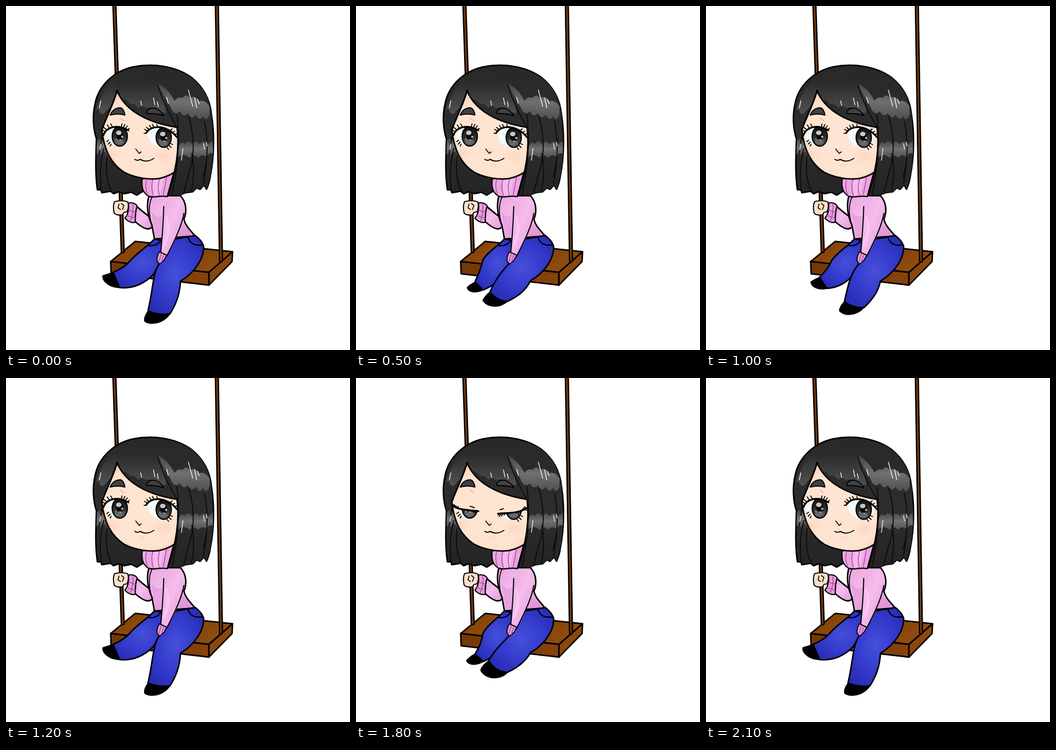
Write an HTML page without scripts that moves like this. It is 700 px wide and 700 px high and loops after 2200 ms.

```html
<!DOCTYPE html>
<html lang="en">
<head>
<meta charset="utf-8">
<title>Girl on a swing</title>
<style>
html, body { margin: 0; width: 100%; height: 100%; overflow: hidden; background: #fff; }
svg { display: block; width: 100vw; height: 100vh; }
path { stroke-linecap: round; stroke-linejoin: round; }
.ink { stroke: #000; stroke-width: 3; }
.thin { stroke: #000; stroke-width: 1.8; fill: none; }
.line { stroke: #000; stroke-width: 3; fill: none; }
.rib { stroke: #a8479d; stroke-width: 1.5; fill: none; }
.shine { stroke: #fff; stroke-width: 1.4; fill: none; }
.lock { stroke: #0b0b0b; stroke-width: 2; fill: none; }

.leg, .foot { d: var(--out); animation: swing 2.2s steps(3) infinite; }
.lid, .cover { d: var(--open); animation: blink 2.2s steps(3) infinite; }
.lid { stroke: #000; stroke-width: 3.6; fill: none; }
.lash { stroke-width: 1.9; }
.cover { fill: #fee4d1; }

/* one step per 100 ms */
@keyframes swing {
  0%, 95.45%, 100% { d: var(--out); animation-timing-function: steps(2); }
  9.09% { d: var(--mid); animation-timing-function: steps(5); }
  31.81% { d: var(--in); animation-timing-function: steps(5); }
  54.54% { d: var(--out); }
  68.18% { d: var(--mid2); }
  81.81% { d: var(--near); }
}
@keyframes blink {
  0%, 54.54%, 95.45%, 100% { d: var(--open); }
  68.18% { d: var(--half); }
  81.81% { d: var(--low); }
}

.back.leg {
  --out: path("M302 474C290 488 269 500 252 519C243 530 230 537 218 542L231 573C259 576 284 564 301 545L335 480Z");
  --mid: path("M302 474C290 488 269 500 254 518C247 531 239 541 229 554L244 579C266 575 286 563 302 545L335 480Z");
  --mid2: path("M302 474C290 488 269 500 254 518C247 531 239 541 229 554L244 579C266 575 286 563 302 545L335 480Z");
  --near: path("M302 474C290 488 269 500 258 520C256 538 250 548 242 562L259 577C272 572 286 560 302 545L335 480Z");
  --in: path("M302 474C290 488 267 500 261 516C260 538 254 550 251 567L268 577C280 570 290 562 302 545L335 480Z");
}
.back.foot {
  --out: path("M218 542C208 546 202 547 197 549C196 561 212 573 231 573Z");
  --mid: path("M229 554C219 558 213 559 209 562C208 575 224 580 244 579Z");
  --mid2: path("M229 554C219 558 213 559 209 562C208 575 224 580 244 579Z");
  --near: path("M242 562C234 565 229 571 225 575C228 584 244 586 259 577Z");
  --in: path("M251 567C245 571 240 576 238 580C241 586 254 589 268 577Z");
}
.front.leg {
  --out: path("M345 474C336 490 322 508 313 523C298 542 300 575 289 620C300 626 320 629 334 626C350 600 354 580 355 560C385 542 404 512 402 488C398 478 392 472 385 467Z");
  --mid: path("M345 474C336 490 322 508 313 523C300 545 292 572 275 597C286 605 300 610 314 612C335 597 348 578 355 559C385 542 404 512 402 488C398 478 392 472 385 467Z");
  --mid2: path("M345 474C336 490 322 508 313 523C298 543 288 570 271 594C282 602 298 606 311 605C333 592 346 576 355 559C385 542 404 512 402 488C398 478 392 472 385 467Z");
  --near: path("M345 474C336 490 322 508 313 523C296 541 280 556 270 575C278 590 294 599 308 599C332 588 346 575 355 559C385 542 404 512 402 488C398 478 392 472 385 467Z");
  --in: path("M345 474C336 490 322 508 313 523C290 540 274 553 271 572C278 586 292 595 304 594C332 584 346 575 355 559C385 542 404 512 402 488C398 478 392 472 385 467Z");
}
.front.foot {
  --out: path("M289 621C284 628 281 636 282 641C290 649 318 649 334 626C320 629 300 627 289 621Z");
  --mid: path("M275 597C268 604 262 611 262 616C272 630 300 629 314 612C300 610 286 605 275 597Z");
  --mid2: path("M271 594C263 600 257 605 257 609C266 623 298 624 311 605C298 606 282 602 271 594Z");
  --near: path("M270 575C262 582 254 589 254 595C264 614 294 615 308 599C294 599 278 590 270 575Z");
  --in: path("M271 572C263 578 258 584 256 589C270 605 288 604 304 594C292 595 278 586 271 572Z");
}

.left.cover {
  --open: path("M199 263C204 248 226 236 249 252L250 236L200 236Z");
  --half: path("M197 262C208 255 232 255 250 265L250 236L200 236Z");
  --low: path("M197 261C210 271 232 268 250 271L250 236L200 236Z");
}
.left.lid {
  --open: path("M198 263C204 247 226 239 249 253");
  --half: path("M197 260C208 254 232 255 248 265");
  --low: path("M197 260C210 270 232 268 249 271");
}
.left.lash {
  --open: path("M202 256L196 252M205 252L199 247M210 248L206 242M216 245L213 240M239 247L242 241M243 249L247 244M247 252L251 249M235 245L236 240");
  --half: path("M200 259L195 256M202 258L198 255M206 257L202 254M214 256L211 254M239 259L240 258M244 262L246 261M247 264L248 263M233 257L234 256");
  --low: path("M201 262L197 257M204 264L200 258M207 266L203 260M210 267L207 261M233 269L240 273M240 270L244 274M232 261L236 262M236 262L241 264");
}
.right.cover {
  --open: path("M284 262C292 240 326 238 349 267L352 236L280 236Z");
  --half: path("M281 266C298 258 328 260 348 266L352 236L280 236Z");
  --low: path("M286 278C306 274 330 277 348 264L352 236L280 236Z");
}
.right.lid {
  --open: path("M286 257C296 242 326 241 348 267");
  --half: path("M281 265C298 257 328 260 348 266");
  --low: path("M289 276C306 274 330 277 348 264");
}
.right.lash {
  --open: path("M289 255L282 251M292 252L286 247M296 249L292 243M301 247L298 241M286 259L281 259M334 254L338 250M338 258L343 255M342 262L348 260M308 246L307 241");
  --half: path("M287 263L281 262M291 261L285 260M295 260L290 258M300 260L297 258M285 265L282 268M334 262L337 260M338 263L343 261M342 265L349 262M308 260L306 259");
  --low: path("M292 277L289 279M295 277L291 282M299 276L296 281M303 276L301 279M293 268L300 266M337 270L344 262M339 269L349 265M342 267L349 270M310 276L308 278");
}
</style>
</head>
<body>
<svg viewBox="0 0 700 700">
  <defs>
    <linearGradient id="wood" x1="0" x2="1" y2=".4">
      <stop offset="0" stop-color="#7d3d05"/><stop offset=".4" stop-color="#924c0b"/>
      <stop offset=".6" stop-color="#7f3f05"/><stop offset="1" stop-color="#8f4c0f"/>
    </linearGradient>
    <linearGradient id="plank" x1="0" x2="1">
      <stop offset="0" stop-color="#743804"/><stop offset="1" stop-color="#87430a"/>
    </linearGradient>
    <linearGradient id="knit" x1="0" x2="1" y2="1">
      <stop offset="0" stop-color="#eaa6e0"/><stop offset=".45" stop-color="#f5bdec"/>
      <stop offset="1" stop-color="#e397d8"/>
    </linearGradient>
    <radialGradient id="jeans" cx=".5" cy=".48" r=".6">
      <stop offset="0" stop-color="#4650d9"/><stop offset=".5" stop-color="#363dce"/>
      <stop offset="1" stop-color="#282cb6"/>
    </radialGradient>
    <radialGradient id="skin" gradientUnits="userSpaceOnUse" cx="275" cy="270" r="105">
      <stop offset="0" stop-color="#fee5d3"/><stop offset=".75" stop-color="#fee3cf"/>
      <stop offset="1" stop-color="#fbd0b8"/>
    </radialGradient>
    <radialGradient id="blush">
      <stop offset="0" stop-color="#f7a99b" stop-opacity=".22"/><stop offset="1" stop-color="#f7a99b" stop-opacity="0"/>
    </radialGradient>
    <linearGradient id="iris" x2="0" y2="1">
      <stop offset="0" stop-color="#0d0d0d"/><stop offset=".5" stop-color="#2c2c2c"/>
      <stop offset="1" stop-color="#606060"/>
    </linearGradient>
    <linearGradient id="gloss" x2="0" y2="1">
      <stop offset="0" stop-color="#555" stop-opacity="0"/><stop offset="1" stop-color="#606060"/>
    </linearGradient>
    <linearGradient id="band" x2="0" y2="1">
      <stop offset="0" stop-color="#444"/><stop offset=".5" stop-color="#707070"/>
      <stop offset="1" stop-color="#505050"/>
    </linearGradient>
    <linearGradient id="hair" x2="0" y2="1">
      <stop offset="0" stop-color="#292929"/><stop offset=".55" stop-color="#2d2d2d"/>
      <stop offset="1" stop-color="#242424"/>
    </linearGradient>
    <g id="eye">
      <ellipse rx="15.5" ry="20" fill="url(#iris)" stroke="#000" stroke-width="2.4"/>
      <ellipse cy="-1" rx="7" ry="9" fill="#0a0a0a"/>
      <ellipse cx="-1" cy="11" rx="9" ry="5" fill="#858585" opacity=".5"/>
      <ellipse cx="-2" cy="-7" rx="5.5" ry="4.5" fill="#c8c8c8"/>
      <circle cx="5" cy="1" r="2.2" fill="#bbb"/>
      <circle cx="-8" cy="6" r="1.5" fill="#999"/>
      <circle cx="1" cy="8" r="1.2" fill="#ccc"/>
    </g>
  </defs>

  <!-- swing -->
  <g class="ink">
    <path d="M213 520L263 479L461 500L413 542Z" fill="url(#wood)"/>
    <path d="M213 520L413 542V568L214 545Z" fill="url(#plank)"/>
    <path d="M413 542L461 500L460 520L413 568Z" fill="#8a480d"/>
  </g>
  <g fill="none">
    <path d="M220.5 -5L237.5 499M429 -5L437.5 518" stroke="#000" stroke-width="8.6"/>
    <path d="M220.5 -5L237.5 499M429 -5L437.5 518" stroke="#7b3a06" stroke-width="3.2"/>
  </g>

  <!-- holding arm -->
  <path class="ink" d="M265 407C273 414 281 421 291 428L298 449C291 457 281 455 262 438Z" fill="url(#knit)"/>
  <path class="ink" d="M249 401C256 399 264 402 267 407C263 417 263 428 263 440C256 442 248 438 242 432C248 424 251 413 249 401Z" fill="#e79cdc" style="stroke-width:2.4"/>
  <path class="rib" d="M258 404Q260 420 253 437M248 415L264 420M245 426L263 432"/>
  <path class="ink" d="M221 398C228 396 242 395 248 399C250 406 249 413 246 419L240 420L237 425C230 426 222 425 220 421C218 412 218 404 221 398Z" fill="#fde0ca" style="stroke-width:2.2"/>
  <path class="thin" d="M230 403L228 411L233 414M235 402L240 406L237 414"/>

  <!-- body -->
  <path class="ink" d="M291 386C285 406 289 428 297 446L302 474L385 468C374 455 365 447 362 434C368 420 368 400 355 386Z" fill="url(#knit)"/>
  <path d="M296 418Q308 435 318 425L316 470L303 471Z" fill="#d583cb" opacity=".4"/>
  <path d="M353 440Q365 448 378 466L346 469Z" fill="#d583cb" opacity=".35"/>
  <path class="thin" d="M297 389C290 404 290 425 297 446"/>

  <!-- legs -->
  <path class="back leg ink" fill="url(#jeans)"/>
  <path class="back foot ink" style="stroke-width:2"/>
  <path class="thin" d="M289 487Q306 491 317 475" style="stroke-width:2.4"/>
  <path class="front leg ink" fill="url(#jeans)"/>
  <path class="front foot ink" style="stroke-width:2"/>
  <path class="thin" d="M370 470Q376 490 400 486" style="stroke-width:2.6"/>

  <!-- resting arm -->
  <path d="M320 408C320 440 318 470 315 500L327 508C342 485 358 452 362 418C362 396 350 390 338 390Z" fill="url(#knit)"/>
  <path class="line" d="M321 408C320 440 318 470 315 501M362 422C358 444 348 468 327 509" style="stroke-width:2.2"/>
  <path d="M326 430Q335 455 322 486" stroke="#fbd3f5" stroke-width="6" fill="none" opacity=".5"/>
  <path class="ink" d="M312 500L327 507L322 517L313 525C306 522 305 514 312 500Z" fill="#e79cdc" style="stroke-width:2"/>
  <path class="rib" d="M316 504L311 521M321 507L316 522"/>

  <!-- head -->
  <path class="ink" d="M186 374C181 340 183 305 184 270C177 250 176 222 181 200C188 160 222 132 258 124C300 116 345 122 377 145C402 165 415 190 418 220C424 255 424 305 416 345Q414 360 408 373L403 364L395 373L388 370L380 378L365 380L352 385L330 385L300 375L277 378L266 385L255 379L241 382L229 378L219 382L213 377L195 380L193 374Z" fill="url(#hair)"/>
  <path class="ink" d="M277 352L341 340L328 388C312 384 304 392 290 387Q274 378 277 352Z" fill="#eba5e1" style="stroke-width:2.4"/>
  <path d="M298 352L322 348L314 384L300 386Z" fill="#f8c6f1" opacity=".6"/>
  <path class="rib" d="M286 354Q282 369 288 384M299 353Q294 369 300 386M313 351Q307 369 312 385M327 347L320 384"/>
  <path class="ink" d="M226 172C220 196 206 222 195 252C199 290 212 320 240 338C262 350 292 354 312 351Q330 347 343 338C352 300 352 262 349 240L280 200Z" fill="url(#skin)"/>
  <ellipse cx="215" cy="300" rx="20" ry="14" fill="url(#blush)"/>
  <ellipse cx="322" cy="306" rx="24" ry="16" fill="url(#blush)"/>
  <ellipse cx="270" cy="295" rx="11" ry="9" fill="url(#blush)"/>
  <ellipse cx="279" cy="324" rx="9" ry="4" fill="url(#blush)"/>

  <path d="M202 262C207 244 238 238 248 254C248 272 240 285 228 285C214 284 205 276 202 262Z" fill="#f4fbfc"/>
  <use href="#eye" x="231.5" y="265"/>
  <path d="M288 262C296 242 332 242 343 266C342 278 334 288 318 288C302 287 291 277 288 262Z" fill="#f4fbfc"/>
  <use href="#eye" x="321" y="267.5"/>
  <path class="left cover"/>
  <path class="right cover"/>
  <path class="left lid"/>
  <path class="left lid lash"/>
  <path class="right lid"/>
  <path class="right lid lash"/>
  <path class="thin" d="M205 276L209 273M208 281L212 277M212 285L214 281M328 288L331 292M332 284L336 288M335 280L339 282"/>

  <path d="M232 228L240 234" stroke="#e9a48e" stroke-width="1.3" fill="none"/>
  <path class="thin" d="M264 291L271 300L275 297"/>
  <path class="line" d="M262 312Q268 316 273 312Q286 320 301 310" style="stroke-width:2.1"/>

  <!-- fringe and side hair -->
  <path d="M226 172C238 203 272 235 348 247C354 290 346 335 330 385L352 385L365 380L380 378L388 370L395 373L403 364L408 373C421 340 424 300 418 220C415 190 402 165 377 145C340 120 270 118 235 142Z" fill="url(#hair)"/>
  <path d="M183 213Q187 206 191 216Q197 224 203 214L212 205L226 172L222 148Q196 168 183 213Z" fill="url(#gloss)" opacity=".75"/>
  <path d="M227 153L222 177Q231 181 236 191Q245 188 252 199Q262 197 269 207Q277 200 285 208Q297 202 311 216L326 218L318 153Z" fill="url(#gloss)" opacity=".7"/>
  <path d="M308 158Q328 165 343 193Q350 183 359 187Q367 177 374 187Q386 181 393 194Q404 189 414 204V221Q408 238 401 224Q394 237 386 221Q378 234 370 218Q361 229 354 214Q342 226 334 204Z" fill="url(#band)"/>
  <path d="M352 285Q357 272 363 281Q371 269 379 281Q387 271 394 281Q403 270 410 282L421 274V301Q414 296 408 308Q400 299 391 309Q382 299 373 309Q363 298 349 309Z" fill="url(#band)"/>
  <path d="M185 273Q192 266 198 276L204 299Q198 293 193 303Q188 296 184 303Z" fill="url(#band)"/>
  <path class="line" d="M226 172C238 203 272 235 348 247C354 290 346 335 330 385"/>
  <path class="line" d="M226 172C220 196 206 222 195 252"/>
  <path class="lock" d="M309 160Q320 200 348 247M348 222Q357 295 338 384M372 224Q390 290 372 340L362 379M378 300Q386 340 377 376M404 235Q416 300 401 348M408 320L402 362M195 265L190 300M199 290Q188 330 194 376M206 305Q200 350 215 378"/>
  <path class="shine" d="M274 193L276 202M300 187L303 201M308 195L310 205M327 186L330 198M371 171L380 204M384 187L388 207M390 190L393 199M360 290L357 314M402 280L404 291M408 277L409 285M193 193L190 207M193 281L191 292"/>

  <path class="ink" d="M212 222Q218 207 233 207Q240 209 242 222Q227 218 212 222Z" fill="#414141" style="stroke-width:2.2"/>
  <path class="ink" d="M286 217Q289 207 302 208Q314 211 321 223Q304 218 288 219Z" fill="#414141" style="stroke-width:2.2"/>
</svg>
</body>
</html>
```
